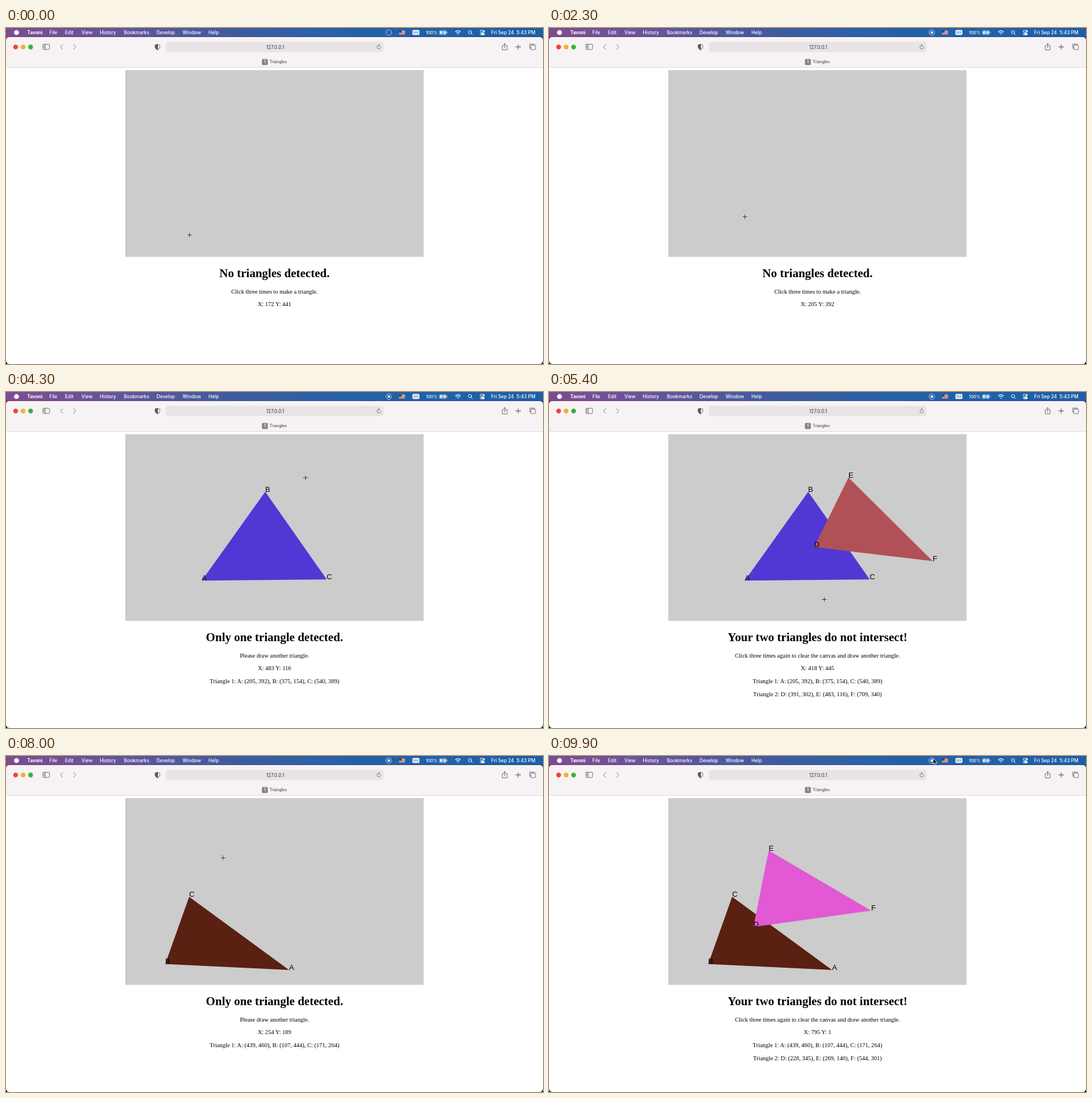
Recreate the animation shown at these times as an HTML page. Size 947x592 px, loop 10000 ms.

```html
<!DOCTYPE html>
<html lang="en">
<head>
<meta charset="utf-8">
<title>Triangles</title>
<style>
html, body { margin: 0; width: 100%; height: 100%; overflow: hidden; background: #fff; }
svg { display: block; width: 947px; height: 592px; }
.ui { font-family: Inter, "Open Sans", sans-serif; font-size: 8.3px; }
.menu { fill: #fff; font-weight: 500; }
.page { font-family: "Liberation Serif", "Times New Roman", serif; font-size: 10.52px; text-anchor: middle; }
.page .head { font-size: 21.04px; font-weight: bold; }
.label { font-family: "Liberation Sans", Arial, sans-serif; font-size: 20px; }
.line { fill: none; stroke-linecap: round; stroke-linejoin: round; }
</style>
</head>
<body>
<svg viewBox="0 0 947 592">
  <defs>
    <linearGradient id="bar">
      <stop offset="0" stop-color="#7b4d8f"/>
      <stop offset=".2" stop-color="#65549a"/>
      <stop offset=".42" stop-color="#3f5b9e"/>
      <stop offset=".65" stop-color="#2362a8"/>
      <stop offset="1" stop-color="#1d5ea6"/>
    </linearGradient>
    <linearGradient id="edge">
      <stop offset="0" stop-color="#a3203f"/>
      <stop offset=".4" stop-color="#4a4a80"/>
      <stop offset="1" stop-color="#173f78"/>
    </linearGradient>
  </defs>

  <!-- desktop and window -->
  <rect width="947" height="592" fill="#15131a"/>
  <rect width="947" height="40" fill="url(#edge)"/>
  <rect width="947" height="15.5" fill="url(#bar)"/>
  <rect y="16" width="947" height="576" rx="6" fill="#fff"/>
  <path d="M0 69V22a6 6 0 0 1 6-6H941a6 6 0 0 1 6 6V69z" fill="#f7f3f5"/>
  <rect y="69" width="947" height="1" fill="#dcd9db"/>

  <!-- menu bar -->
  <g id="menu" class="ui menu">
    <circle cx="18.5" cy="8" r="4.3"/>
    <text x="740.5" y="10.6" font-size="7.6">100%</text>
    <text x="855.5" y="10.8" xml:space="preserve">Fri Sep 24  5:43 PM</text>
  </g>
  <circle cx="675" cy="8" r="4.9" fill="none" stroke="#c9d7ea" stroke-width=".9"/>
  <rect id="rec" x="673" y="6" width="4" height="4" rx=".6" fill="#fff"/>
  <rect x="693" y="4.3" width="10.4" height="7.2" fill="#e9dfe2"/>
  <path d="M693 4.9h10.4M693 7.1h10.4M693 9.2h10.4M693 11.1h10.4" stroke="#b8434c" stroke-width="1"/>
  <rect x="693" y="4.3" width="4.6" height="3.9" fill="#33406f"/>
  <rect x="716.8" y="3.6" width="12.2" height="8.6" rx="1.6" fill="#fff"/>
  <path d="M719.3 5.5v4.8M721.7 5.5v4.8M724.1 5.5v4.8M726.5 5.5v4.8" stroke="#2b63a5" stroke-width=".9"/>
  <rect x="764" y="4.3" width="13" height="7.4" rx="2" fill="none" stroke="#b9cbe2" stroke-width=".7"/>
  <rect x="765.2" y="5.4" width="10.6" height="5.2" rx="1" fill="#fff"/>
  <path d="M778.3 6.8v2.4" stroke="#b9cbe2"/>
  <path d="M771.6 3.6l-3.6 5h2.5l-.8 3.8 3.8-5.1h-2.6z" fill="#fff" stroke="#2362a8" stroke-width=".7"/>
  <g class="line" stroke="#fff" stroke-width="1.2">
    <path d="M792.5 6.7q4.6-4 9.2 0M794.3 8.7q2.8-2.4 5.6 0M796.6 10.7l.5.4.5-.4"/>
    <circle cx="818.2" cy="7.3" r="2.8" stroke-width="1"/>
    <path d="M820.4 9.5l2.2 2.3" stroke-width="1"/>
    <rect x="836" y="4.1" width="8" height="3.3" rx="1.6" stroke-width=".9"/>
    <rect x="835.8" y="8.8" width="8.4" height="3.6" rx="1.8" fill="#fff" stroke="none"/>
  </g>
  <circle cx="842.2" cy="5.7" r="1.2" fill="#fff"/>
  <circle cx="837.8" cy="10.6" r="1.1" fill="#2362a8"/>

  <!-- toolbar -->
  <circle cx="17" cy="33.5" r="4.2" fill="#ee4440"/>
  <circle cx="30.2" cy="33.5" r="4.2" fill="#f3b02b"/>
  <circle cx="43.4" cy="33.5" r="4.2" fill="#36b13a"/>
  <rect x="282" y="24.5" width="383.5" height="18" rx="4" fill="#e8e4e6"/>
  <g class="line" stroke="#5d5a5e" stroke-width=".9">
    <rect x="65" y="28.7" width="11.8" height="9.2" rx="1.6"/>
    <path d="M69.2 28.7v9.2M66.5 31h1.2M66.5 33h1.2M66.5 35h1.2"/>
    <path d="M100 29.5l-4 4 4 4M119.2 29.5l4 4-4 4" stroke="#aaa6aa" stroke-width="1.1"/>
    <path d="M267.2 28.8l4.1 1.3v3.6q0 3-4.1 4.8-4.1-1.8-4.1-4.8v-3.6z"/>
    <path d="M267.2 28.8l-4.1 1.3v3.6q0 3 4.1 4.8z" fill="#5d5a5e"/>
    <path d="M660.6 33.2a3.2 3.2 0 1 1-2-2.5M657 29l2 1.7-1.8 1.7" stroke-width=".8"/>
    <path d="M877.8 31.2h-2.6v7.4h8.6v-7.4h-2.6M879.5 35v-7.6M877.4 29.3l2.1-2.1 2.1 2.1"/>
    <path d="M903.2 29.2v8.4M899 33.4h8.4" stroke-width="1.1"/>
    <path d="M925 35.6h-1.4v-7.3h8v1.8"/>
    <rect x="925.5" y="30.2" width="8.3" height="7.9" rx="1.2"/>
  </g>
  <g class="ui" fill="#333134">
    <text x="474.5" y="36.8" text-anchor="middle">127.0.0.1</text>
    <rect x="451.2" y="54.6" width="10.6" height="10.6" rx="2" fill="#87848b"/>
    <text x="456.5" y="62.4" text-anchor="middle" font-size="7" font-weight="600" fill="#fff">1</text>
    <text x="464.8" y="62.4" font-size="7">Triangles</text>
  </g>

  <!-- page -->
  <rect x="210.3" y="74.3" width="526.2" height="328.9" fill="#ccc"/>
  <g id="stage" transform="translate(210.5 74.5) scale(.6576)"></g>
  <g class="page">
    <text id="head" class="head" x="473.5" y="439"></text>
    <text id="hint" x="473.5" y="467.7"></text>
    <text id="coords" x="473.5" y="490.2"></text>
    <text id="tri1" x="473.5" y="512.7"></text>
    <text id="tri2" x="473.5" y="536.2"></text>
  </g>
  <g id="cross" class="line">
    <path d="M-4.4 0H4.4M0-4.4V4.4" stroke="#fff" stroke-opacity=".55" stroke-width="2.2"/>
    <path d="M-4 0H4M0-4V4" stroke="#111" stroke-width=".9"/>
  </g>
  <path id="arrow" d="M0 0V9.6L2.2 7.6 3.7 11 5.4 10.3 3.9 7H6.9Z" fill="#000" stroke="#fff" stroke-width=".8"/>
</svg>
<script>
const LOOP = 10000, STEP = 100, LAG = 50;
const $ = id => document.getElementById(id);

const menu = [["Tavoni", 37.5], ["File", 76.5], ["Edit", 104], ["View", 133], ["History", 165.5],
  ["Bookmarks", 208], ["Develop", 265.5], ["Window", 311.5], ["Help", 357]];
$("menu").innerHTML += menu.map(([word, x], i) =>
  `<text x="${x}" y="10.8"${i ? "" : ' font-weight="700"'}>${word}</text>`).join("");

// Pointer path: time, then position in canvas units (800 by 500).
const path = [
  [0, 172, 441], [600, 172, 441], [950, 173, 484], [1050, 180, 516], [1300, 207, 582],
  [1500, 212, 580], [1800, 207, 480], [2200, 205, 392], [2300, 205, 392],
  [2700, 375, 154], [2800, 375, 154], [3200, 540, 389], [3350, 540, 389],
  [3800, 391, 302], [3900, 391, 302], [4250, 483, 116], [4350, 483, 116],
  [4700, 709, 340], [4850, 709, 340], [5350, 418, 445], [5400, 418, 442],
  [5700, 439, 460], [5800, 439, 460], [6300, 107, 444], [6400, 107, 444],
  [6900, 171, 264], [7150, 171, 264], [7600, 228, 345], [7700, 228, 345],
  [7950, 254, 189], [8000, 262, 159], [8100, 269, 140], [8200, 269, 140],
  [8600, 544, 301], [8700, 544, 301], [9150, 795, 1], [9250, 785, -35],
  [9600, 710, -107], [LOOP, 710, -107]
];

const secant = (i, k) => (path[i + 1][k] - path[i][k]) / (path[i + 1][0] - path[i][0]);

// Monotone slope: zero at turning points, so the pointer rests on each click.
function slope(i, k) {
  if (i < 1 || i > path.length - 2) return 0;
  const a = secant(i - 1, k), b = secant(i, k);
  return a * b > 0 ? 2 * a * b / (a + b) : 0;
}

function pointer(t) {
  t = Math.max(0, t);
  const i = path.findIndex((p, n) => n === path.length - 2 || t < path[n + 1][0]);
  const h = path[i + 1][0] - path[i][0], u = (t - path[i][0]) / h, v = 1 - u;
  return [1, 2].map(k =>
    v * v * (1 + 2 * u) * path[i][k] + u * u * (3 - 2 * u) * path[i + 1][k] +
    h * u * v * (v * slope(i, k) - u * slope(i + 1, k)));
}

const inside = ([x, y]) => x >= 0 && x <= 800 && y >= 0 && y <= 500;

// Last position the page heard about, a little behind the pointer.
function reported(t) {
  let p = pointer(t - LAG);
  while (!inside(p)) p = pointer((t -= STEP) - LAG);
  return p.map(Math.round);
}

const blue = { fill: "#5137d4", names: "ABC", points: [[205, 392], [375, 154], [540, 389]] };
const red = { fill: "#b25057", names: "DEF", points: [[391, 302], [483, 116], [709, 340]] };
const brown = { fill: "#5a2012", names: "ABC", points: [[439, 460], [107, 444], [171, 264]] };
const pink = { fill: "#e259d3", names: "DEF", points: [[228, 345], [269, 140], [544, 301]] };
const scenes = [[0], [3400, blue], [4800, blue, red], [7200, brown], [8700, brown, pink]];

const messages = [
  ["No triangles detected.", "Click three times to make a triangle."],
  ["Only one triangle detected.", "Please draw another triangle."],
  ["Your two triangles do not intersect!", "Click three times again to clear the canvas and draw another triangle."]
];

const shape = tri => `<polygon points="${tri.points.join(" ")}" fill="${tri.fill}"/>`;
const labels = tri => tri.points.map(([x, y], i) =>
  `<text class="label" x="${x}" y="${y}">${tri.names[i]}</text>`).join("");
const listing = (tri, n) => tri ? `Triangle ${n}: ` + tri.points.map((p, i) =>
  `${tri.names[i]}: (${p.join(", ")})`).join(", ") : "";

let shown;
function showScene(scene) {
  if (scene === shown) return;
  shown = scene;
  const tris = scene.slice(1);
  $("stage").innerHTML = tris.map(shape).join("") + tris.map(labels).join("");
  [$("head").textContent, $("hint").textContent] = messages[tris.length];
  $("tri1").textContent = listing(tris[0], 1);
  $("tri2").textContent = listing(tris[1], 2);
}

function draw(t) {
  showScene(scenes.filter(s => s[0] <= t).pop());
  const p = pointer(t), [x, y] = reported(t), over = inside(p);
  $("coords").textContent = `X: ${x} Y: ${y}`;
  const place = `translate(${210.6 + p[0] * .6576} ${74.8 + p[1] * .6576})`;
  for (const [id, on] of [["cross", over], ["arrow", !over]]) {
    $(id).setAttribute("transform", place);
    $(id).style.display = on ? "" : "none";
  }
  $("rec").style.display = t < 1600 ? "none" : "";
}

const start = performance.now();
function tick() {
  const t = (performance.now() - start) % LOOP;
  draw(Math.floor(t / STEP) * STEP);
  requestAnimationFrame(tick);
}
tick();
</script>
</body>
</html>
```
